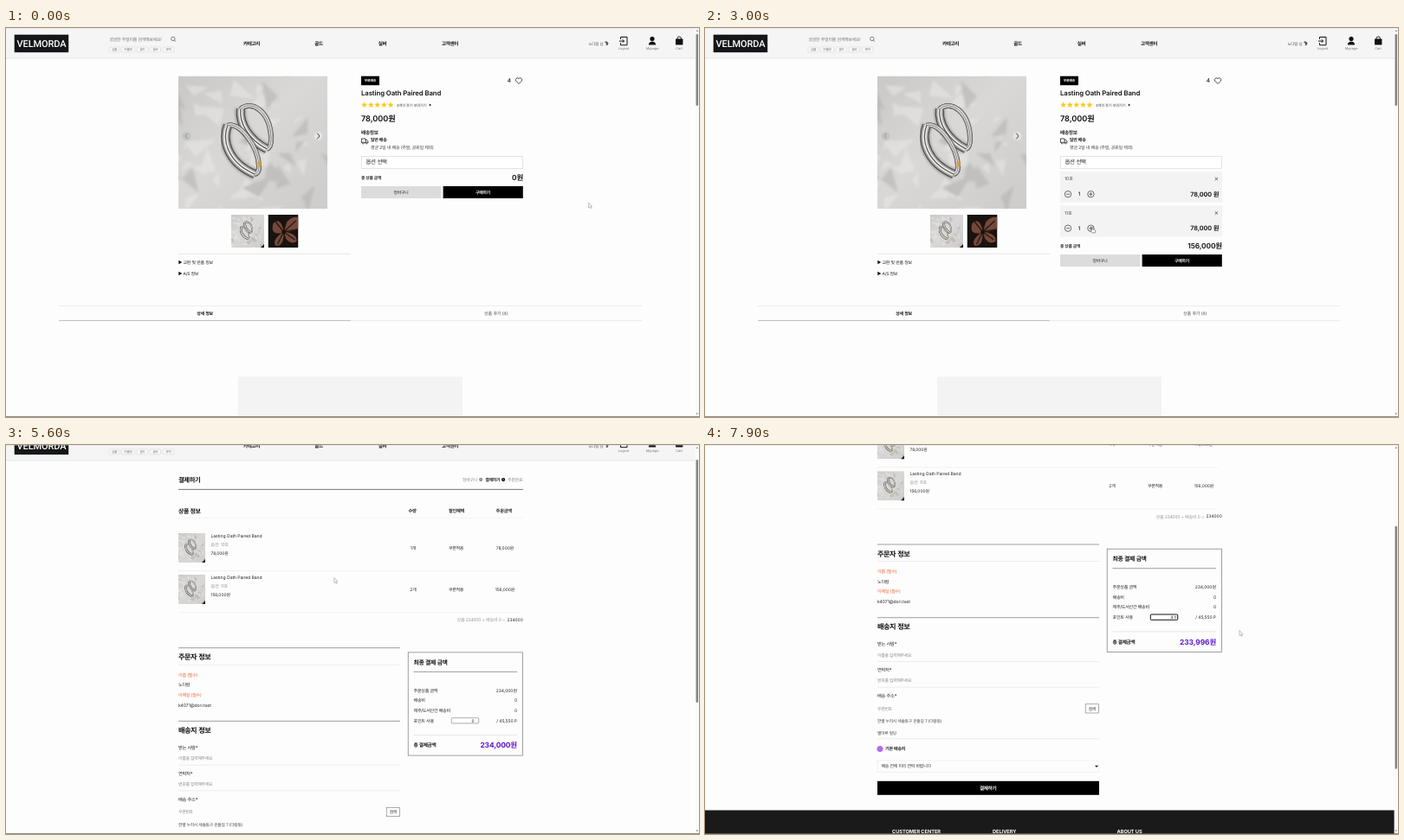
These frames come from a looping animation (800 by 450 pixels, 8000 ms). An HTML page:

```html
<!DOCTYPE html>
<html lang="ko">
<head>
<meta charset="utf-8">
<title>Ring shop</title>
<style>
html, body { margin: 0; width: 100%; height: 100%; overflow: hidden; background: #fdfdfd; }
svg { display: block; }
#stage { width: 800px; height: 450px; }
text { font-family: Inter, "Noto Sans CJK KR", "Noto Sans CJK", sans-serif; letter-spacing: -.01em; text-rendering: geometricPrecision; white-space: pre; }
text.ko { letter-spacing: -.06em; word-spacing: .06em; }
</style>
</head>
<body>
<svg id="stage" viewBox="0 0 800 450">
  <defs>
    <linearGradient id="paper" x1="0" y1="0" x2="1" y2="1">
      <stop offset="0" stop-color="#c9c8c6"/><stop offset=".45" stop-color="#d9d8d6"/><stop offset="1" stop-color="#cdccca"/>
    </linearGradient>
    <filter id="soft"><feGaussianBlur stdDeviation="1.6"/></filter>
    <filter id="shade" x="-5%" y="-10%" width="110%" height="130%"><feDropShadow dx="0" dy="1" stdDeviation="1" flood-opacity=".3"/></filter>
    <symbol id="photo" viewBox="0 0 172 153" preserveAspectRatio="xMidYMid slice"></symbol>
    <symbol id="flower" viewBox="0 0 35 38"></symbol>
  </defs>
  <g id="shop"></g>
  <g id="pay"></g>
  <g id="bar"></g>
  <path id="arrow" d="M0 0V6L1.4 4.8 2.4 6.8 3.3 6.4 2.4 4.4H4.1Z" fill="#fff" stroke="#999" stroke-width=".6"/>
  <path id="hand" d="M-.6 0Q0-.7.6 0V2.4L3 3Q3.6 3.2 3.5 4L3 6.4H-.4L-2.3 3.8Q-1.8 2.8-.6 3.8Z" fill="#fff" stroke="#555" stroke-width=".6"/>
</svg>
<script>
const $ = id => document.getElementById(id);
const ITEM = 'Lasting Oath Paired Band';
const LOOP = 8000, TICK = 100;

const txt = (x, y, s, size, weight = 400, fill = '#222', anchor = 'start') =>
  `<text x="${x}" y="${y + size * .36}" font-size="${size}" font-weight="${weight}" fill="${fill}" text-anchor="${anchor}"${/[가-힣]{2}/.test(s) ? ' class="ko"' : ''}>${s}</text>`;
const mid = (x, y, s, size, weight, fill) => txt(x, y, s, size, weight, fill, 'middle');
const end = (x, y, s, size, weight, fill) => txt(x, y, s, size, weight, fill, 'end');
const box = (x, y, w, h, fill, stroke = 'none', sw = .6, r = 0) =>
  `<rect x="${x}" y="${y}" width="${w}" height="${h}" rx="${r}" fill="${fill}" stroke="${stroke}" stroke-width="${sw}"/>`;
const rule = (x1, x2, y, c = '#e6e6e6', w = .7) => `<path d="M${x1} ${y}H${x2}" stroke="${c}" stroke-width="${w}"/>`;
const line = (d, c = '#222', w = .8, fill = 'none') => `<path d="${d}" fill="${fill}" stroke="${c}" stroke-width="${w}"/>`;
const shape = (d, c = '#111') => `<path d="${d}" fill="${c}"/>`;
const dot = (x, y, r, fill, stroke = 'none', sw = .6) => `<circle cx="${x}" cy="${y}" r="${r}" fill="${fill}" stroke="${stroke}" stroke-width="${sw}"/>`;
const image = (id, x, y, w, h) => `<use href="#${id}" x="${x}" y="${y}" width="${w}" height="${h}"/>`;
const won = n => n.toLocaleString('en-US');

// Small seeded generator for the paper folds
function random(seed) {
  return () => (seed = seed * 16807 % 2147483647) / 2147483647;
}

function folds() {
  const rnd = random(77);
  let s = '';
  for (let i = 0; i < 44; i++) {
    const x = rnd() * 172, y = rnd() * 153, a = rnd() * 6.3, r = 14 + rnd() * 24, b = a + .5 + rnd() * .7;
    const p = (ang, len) => `${(x + len * Math.cos(ang)).toFixed(1)} ${(y + len * Math.sin(ang)).toFixed(1)}`;
    s += shape(`M${x.toFixed(1)} ${y.toFixed(1)}L${p(a, r)} ${p(b, r * .6)}Z`, i % 3 ? '#ebeae8' : '#aeadab');
  }
  return `<g filter="url(#soft)" opacity=".5">${s}</g>`;
}

function band(d, w) {
  return line(d, '#45423f', w) + line(d, '#a3a19e', w * .8) + line(d, '#efeeec', w * .45) + line(d, '#5d5a57', w * .13);
}

function drawPhotos() {
  const backRim = 'M72 38C84 27 106 40 107 72Q107 82 102 84', backFace = 'M72 38C70 55 82 74 102 84';
  const frontRim = 'M57 57C70 52 92 80 93 104Q93 112 88 113', frontFace = 'M57 57C50 75 58 100 88 113';
  $('photo').innerHTML = box(0, 0, 172, 153, 'url(#paper)') + folds() +
    `<g filter="url(#soft)" opacity=".5">${line(backFace + frontFace, '#555', 12)}</g>` +
    band(backRim, 6) + band(backFace, 10) + band(frontRim, 6) + band(frontFace, 10) + shape('M91 99l4-1 1 5-3 2z', '#d79a3c');
  $('flower').innerHTML = box(0, 0, 35, 38, '#18120f') +
    shape('M6 10Q14 2 18 18Q22 1 35 3V16Q28 20 20 20Q34 22 33 31Q24 36 18 23Q18 36 9 36Q4 30 16 21Q2 24 6 10Z', '#75493a') +
    line('M18 20L8 7M18 20L32 7M18 20L31 29M18 20L11 34M18 20L34 17M18 20L22 4M18 20L22 36', '#231713', 1.3) + dot(18, 20, 2.4, '#18120f');
}

function header() {
  const tags = [[119, 12, '심플'], [133, 16, '커플링'], [151, 13, '골드'], [166, 12.5, '실버'], [181, 13, '큐빅']];
  const menu = [[283.5, '카테고리'], [361, '골드'], [434.5, '실버'], [512.5, '고객센터']];
  return box(0, 0, 796, 35, '#f5f5f5') + rule(0, 796, 35, '#dcdcdc') +
    box(9.7, 7.7, 62.5, 20.5, '#15161a') +
    '<text x="41" y="22" font-size="11" font-weight="500" fill="#fff" text-anchor="middle" style="font-family:Roboto,sans-serif">VELMORDA</text>' +
    txt(119.5, 13, '궁금한 주얼리를 검색해보세요!', 5, 400, '#777') +
    dot(192.8, 12.5, 2.2, 'none', '#333', .6) + line('M194.4 14.1L196 15.8', '#333', .6) +
    tags.map(([x, w, s]) => box(x, 22, w, 6, '#f8f8f8', '#d0d0d0', .5, 1) + mid(x + w / 2, 25, s, 3.6, 400, '#666')).join('') +
    menu.map(([x, s]) => mid(x, 18, s, 5.6, 600, '#111')).join('') +
    txt(672.5, 18, '노다람 님', 4.5, 400, '#555') + shape('M691 16l2.2-.8 2.4 2.2-1 2.4-2 .4.6-2z', '#555') +
    line('M709.5 13V10.5H717V19.8H709.5V17.2M708 15.1H713.5M711.8 13.3L713.6 15.1 711.8 16.9', '#111', 1) +
    dot(746, 12.6, 2.6, '#111') + shape('M741.8 19.6Q742 15.8 746 15.8T750.2 19.6Z') +
    box(773, 12.6, 8.4, 7, '#111', 'none', 0, .7) + line('M775 13.5V12a2.2 2 0 0 1 4.4 0v1.5', '#111', .9) +
    [[713, 'Logout'], [746, 'Mypage'], [777, 'Cart']].map(([x, s]) => mid(x, 24, s, 3.9, 400, '#777')).join('');
}

function star(x, y) {
  let d = '';
  for (let i = 0; i < 10; i++) {
    const a = i * Math.PI / 5, r = i % 2 ? 1.6 : 3.7;
    d += (i ? 'L' : 'M') + (x + r * Math.sin(a)).toFixed(2) + ' ' + (y - r * Math.cos(a)).toFixed(2);
  }
  return shape(d + 'Z', '#fcc918');
}

function shopPage() {
  return header() + image('photo', 199, 55.6, 172, 153.6) +
    dot(208.5, 125, 5, '#c4c4c4') + line('M209.6 122L207 125 209.6 128', '#8a8a8a', .9) +
    dot(360.5, 125, 5, '#e4e4e4') + line('M359.2 121.5L362 125 359.2 128.5', '#333', .9) +
    image('photo', 260, 216, 38, 38) + shape('M298 250v4h-4z') + image('flower', 302.5, 216, 35, 38) +
    rule(199, 398, 261.3, '#ddd') +
    shape('M199.3 268.7V273.3L203.3 271Z') + txt(204.5, 271, '교환 및 반품 정보', 5) +
    shape('M199.3 281.7V286.3L203.3 284Z') + txt(204.5, 284, 'A/S 정보', 5) +
    rule(61, 734, 321.5) + rule(398, 734, 338.5) + rule(61, 398, 338.5, '#a8a8a8') +
    mid(229.5, 330, '상세 정보', 5, 600, '#111') + mid(565.5, 330, '상품 후기 (4)', 5.2, 400, '#555') +
    box(268, 403.5, 259, 45, '#f3f3f3') +
    box(410, 55.7, 21, 10.5, '#000') + mid(420.4, 61, '무료배송', 3.9, 700, '#fff') +
    mid(581, 61, '4', 6.6, 500) +
    line('M592 64.6L588.8 61.3A2 2 0 0 1 592 58.6A2 2 0 0 1 595.2 61.3Z', '#222', .8) +
    txt(410, 75.2, ITEM, 7.75, 600, '#111') +
    [0, 1, 2, 3, 4].map(i => star(413.6 + i * 7.6, 89)).join('') +
    txt(451, 89, '4개의 후기 보러가기', 4.3, 400, '#444') + shape('M488.8 87.5V90.5L491 89Z') +
    txt(410, 104.3, '78,000원', 9.2, 600, '#111') +
    txt(410, 121, '배송정보', 5.7, 600) +
    line('M410.5 128H415V132.6H410.5ZM415 129.5H416.6L418 131V132.6H415', '#222', .8) +
    dot(412.3, 133, 1, '#fff', '#222', .7) + dot(416.3, 133, 1, '#fff', '#222', .7) +
    txt(420.8, 129.3, '일반 배송', 5.1, 600) + txt(421, 138, '평균 2일 내 배송 (주말, 공휴일 제외)', 5.1, 400, '#444') +
    box(410.4, 148.4, 186, 14, '#fff', '#d2d2d2') + txt(415.5, 155, '옵션 선택', 6.5) + '<g id="order"></g>';
}

const SIZES = ['10호', '11호', '12호'];

function order({ qty = [], hover = -1 }) {
  let s = '';
  qty.forEach((n, i) => {
    const y = 166 + i * 39.5, c = y + 26.2;
    s += box(410, y, 187, 36, '#f3f3f3') + txt(415, y + 8.5, SIZES[i], 5.1, 400, '#444') +
      line(`M588.6 ${y + 6.8}l3.4 3.4m0-3.4l-3.4 3.4`, '#333', .7) +
      dot(419, c, 3.7, 'none', '#333', .7) + line(`M417 ${c}h4`, '#333', .7) + mid(432, c, n, 6.2, 500) +
      dot(445.4, c, 3.7, 'none', '#333', .7) + line(`M443.4 ${c}h4m-2-2v4`, '#333', .7) +
      end(593.5, c, won(n * 78000) + ' 원', 7.3, 600, '#111');
  });
  const y = 173 + qty.length * 39.5;
  s += txt(410, y, '총 상품 금액', 4.8, 600) + end(597, y, won(qty.reduce((a, n) => a + n * 78000, 0)) + '원', 8.4, 600, '#111') +
    box(410, y + 10, 92.4, 14, '#dcdcdc') + mid(456, y + 17, '장바구니', 4.9) +
    box(504.6, y + 10, 92.2, 14, '#000') + mid(550.5, y + 17, '구매하기', 4.9, 700, '#fff');
  if (hover >= 0) {
    s += `<g filter="url(#shade)">${box(410.4, 162.6, 186.2, 45.6, '#fff', '#999')}</g>` + box(410.6, 163 + hover * 11.4, 185.8, 11.3, '#1767d0') +
      ['옵션 선택', ...SIZES].map((o, i) =>
        txt(415.5, 168.6 + i * 11.5, o, i ? 5.9 : 6.5, 400, i == hover ? '#fff' : i ? '#555' : '#777')).join('');
  }
  return s;
}

function payPage() {
  const row = (i, price) => {
    const y = 119 + i * 48;
    return image('photo', 199, y, 31, 34) + shape(`M230 ${y + 30}v4h-4z`, '#222') +
      txt(236.5, y + 3, ITEM, 5.05) + txt(236.5, y + 13, '옵션: ' + SIZES[i], 5.1, 400, '#999') + txt(236.5, y + 23, price, 4.9) +
      mid(470, y + 17, i + 1 + '개', 5) + mid(519.5, y + 17, '쿠폰적용', 5) + mid(576, y + 17, price, 4.9) + rule(199, 592, y + 43.7, '#ececec');
  };
  const field = (y, label, hint) => txt(199, y, label, 5.3, 500) + txt(199, y + 12.5, hint, 4.9, 400, '#888');
  const sum = (y, label, value) => txt(470.5, y, label, 5.1) + end(590, y, value, 5);
  const step = (x, c) => dot(x, 57.2, 2.1, c) + line(`M${x - .5} 56.2l1 1-1 1`, '#fff', .5);
  return header() + txt(199, 57.2, '결제하기', 7.4, 600, '#111') +
    txt(527, 57.2, '장바구니', 5, 400, '#888') + step(548.2, '#888') + txt(553.2, 57.2, '결제하기', 5, 600) + step(574.1, '#111') + txt(579, 57.2, '주문완료', 5, 400, '#888') +
    rule(199, 597, 68.5, '#555', .8) + txt(199, 93.6, '상품 정보', 6.9, 600, '#111') +
    mid(469, 93.6, '수량', 5.3, 600) + mid(520, 93.6, '할인혜택', 5.3, 600) + mid(574.7, 93.6, '주문금액', 5.3, 600) + rule(199, 597, 101.3, '#efefef') +
    row(0, '78,000원') + row(1, '156,000원') +
    end(576, 219.5, '상품 234000 + 배송비 0 =', 5.1, 400, '#999') + end(596.7, 219.5, '234000', 4.9) +
    rule(199, 455, 251.8, '#777') + txt(199, 262.5, '주문자 정보', 8.2, 600, '#111') + rule(199, 455, 271.3) +
    txt(199, 283, '이름 (필수)', 5.1, 400, '#ee6236') + txt(199, 294.7, '노다람', 5.1) +
    txt(199, 306.3, '이메일 (필수)', 5.1, 400, '#ee6236') + txt(199, 318, 'k4071@dori.test', 5.1) +
    rule(199, 455, 336.5, '#777') + txt(199, 347, '배송지 정보', 8.2, 600, '#111') +
    field(367.3, '받는 사람*', '이름을 입력해주세요') + rule(199, 455, 387.3) +
    field(397, '연락처*', '번호를 입력해주세요') + rule(199, 455, 417) +
    txt(199, 426.8, '배송 주소*', 5.3, 500) + txt(199, 441.7, '우편번호', 4.9, 400, '#888') +
    box(439.2, 436.6, 15.2, 10.2, '#fdfdfd', '#777') + mid(446.8, 441.7, '검색', 4.8) +
    txt(199, 456, '한별 누리시 새솔동구 온들길 7 (다람동)', 4.8, 400, '#444') + txt(199, 469.6, '별마루 빌딩', 4.8, 400, '#444') + rule(199, 455, 476.6) +
    dot(202, 488.3, 3.5, '#b866f0') + txt(208, 488.3, '기본 배송지', 5.1, 600) +
    box(199, 501.8, 255.6, 13.6, '#fdfdfd', '#e6e6e6') + txt(203.5, 508.4, '배송 전에 미리 연락 바랍니다', 5, 400, '#333') + shape('M450 507.6h4l-2 2.2z') +
    box(199, 525.6, 256, 16, '#000') + mid(326.7, 534, '결제하기', 5.7, 600, '#fff') +
    box(464.2, 257, 132.4, 119.2, 'none', '#777', .7) + txt(470.5, 268.7, '최종 결제 금액', 6.9, 600, '#111') + rule(470.5, 590, 279.5, '#777') +
    sum(301, '주문상품 금액', '234,000원') + sum(312.7, '배송비', '0') + sum(324.2, '제주/도서산간 배송비', '0') + sum(336, '포인트 사용', '/ 45,550 P') +
    rule(470.5, 590, 352.7, '#ddd') + txt(470.5, 364.5, '총 결제금액', 5.7, 600, '#111') + '<g id="points"></g>' +
    box(0, 559.3, 796, 150, '#1a1a1a') + txt(216, 584, 'CUSTOMER CENTER', 5.7, 700, '#fff') + txt(332, 584, 'DELIVERY', 5.7, 700, '#fff') + txt(475.5, 584, 'ABOUT US', 5.7, 700, '#fff');
}

function points(n) {
  return box(514.3, 332.8, 31.4, 6.3, '#fff', n ? '#111' : '#777', n ? 1 : .6, .8) + mid(539, 336, n, 4.8) +
    (n ? box(541.4, 333.6, 3, 4.8, '#e6e6e6') + shape('M542 335.5l.9-1.2.9 1.2zM542 336.6l.9 1.2.9-1.2z', '#555') : '') +
    end(590, 364.5, won(234000 - n) + '원', 8.4, 700, '#5c14d0');
}

function bar(top, len) {
  return box(795.6, 0, 4.4, 450, '#fafafa') + box(796.5, top, 2.6, len, '#858585', 'none', 0, 1.3) +
    shape('M796.7 4l1.2-1.8 1.2 1.8z', '#777') + shape('M796.7 445.4l1.2 1.8 1.2-1.8z', '#777') +
    rule(0, 800, .2, '#ccc', .5) + rule(0, 800, 449.6, '#666', .8);
}

// Step tables: [ms, ...values]
const CURSOR = [
  [0, 672.5, 202], [900, 474, 158], [1100, 468, 157], [1400, 459, 175], [1600, 452, 179], [1700, 450, 180],
  [1900, 447, 159], [2000, 446, 159], [2200, 441.5, 187.8], [2300, 441, 188], [2700, 457, 227], [3000, 447.3, 230.5],
  [3300, 447.3, 230.5], [3700, 534, 267], [3800, 532, 266], [4200, 434, 192], [4800, 408, 176], [5000, 374.6, 159],
  [5200, 374.6, 159], [5300, 375, 159.5], [5500, 375, 159.5], [5600, 378.8, 153.5], [6500, 378.8, 153.5],
  [7400, 539, 200], [7600, 540, 200], [7900, 617, 214.5]
];
const SCROLL = [[0, 0], [5500, 0], [5700, 34.2], [6100, 102.5], [6300, 136.8]];
const ORDER = [
  [0, {}], [1100, { hover: 0 }], [1500, { hover: 1 }], [1700, { qty: [1] }], [2000, { qty: [1], hover: 0 }],
  [2100, { qty: [1], hover: 1 }], [2200, { qty: [1], hover: 2 }], [2300, { qty: [1, 1] }], [3200, { qty: [1, 2] }]
];
const PAY_AT = 3800, POINTS_AT = 7600;

function at(table, t, ease = k => k) {
  const i = table.findLastIndex(r => r[0] <= t), a = table[i], b = table[i + 1];
  if (!b) return a.slice(1);
  const k = ease((t - a[0]) / (b[0] - a[0]));
  return a.slice(1).map((v, j) => v + (b[j + 1] - v) * k);
}

drawPhotos();
$('shop').innerHTML = shopPage();
$('pay').innerHTML = payPage();

let last = -1;
function frame() {
  const t = Math.floor(performance.now() % LOOP / TICK) * TICK;
  if (t !== last) {
    last = t;
    const paying = t >= PAY_AT, [y] = at(SCROLL, t);
    $('shop').style.display = paying ? 'none' : '';
    $('pay').style.display = paying ? '' : 'none';
    $('pay').setAttribute('transform', `translate(0 ${-y})`);
    $('order').innerHTML = order(ORDER.findLast(r => r[0] <= t)[1]);
    $('points').innerHTML = points(t >= POINTS_AT ? 4 : 0);
    $('bar').innerHTML = paying ? bar(6 + y * .642, 281) : bar(7, 83);
    const [cx, cy] = at(CURSOR, t, k => k * k * (3 - 2 * k));
    const pointing = t >= 2900 && t < PAY_AT;
    for (const id of ['arrow', 'hand']) {
      $(id).style.display = pointing === (id === 'hand') ? '' : 'none';
      $(id).setAttribute('transform', `translate(${cx} ${cy})`);
    }
  }
  requestAnimationFrame(frame);
}
frame();
</script>
</body>
</html>
```
